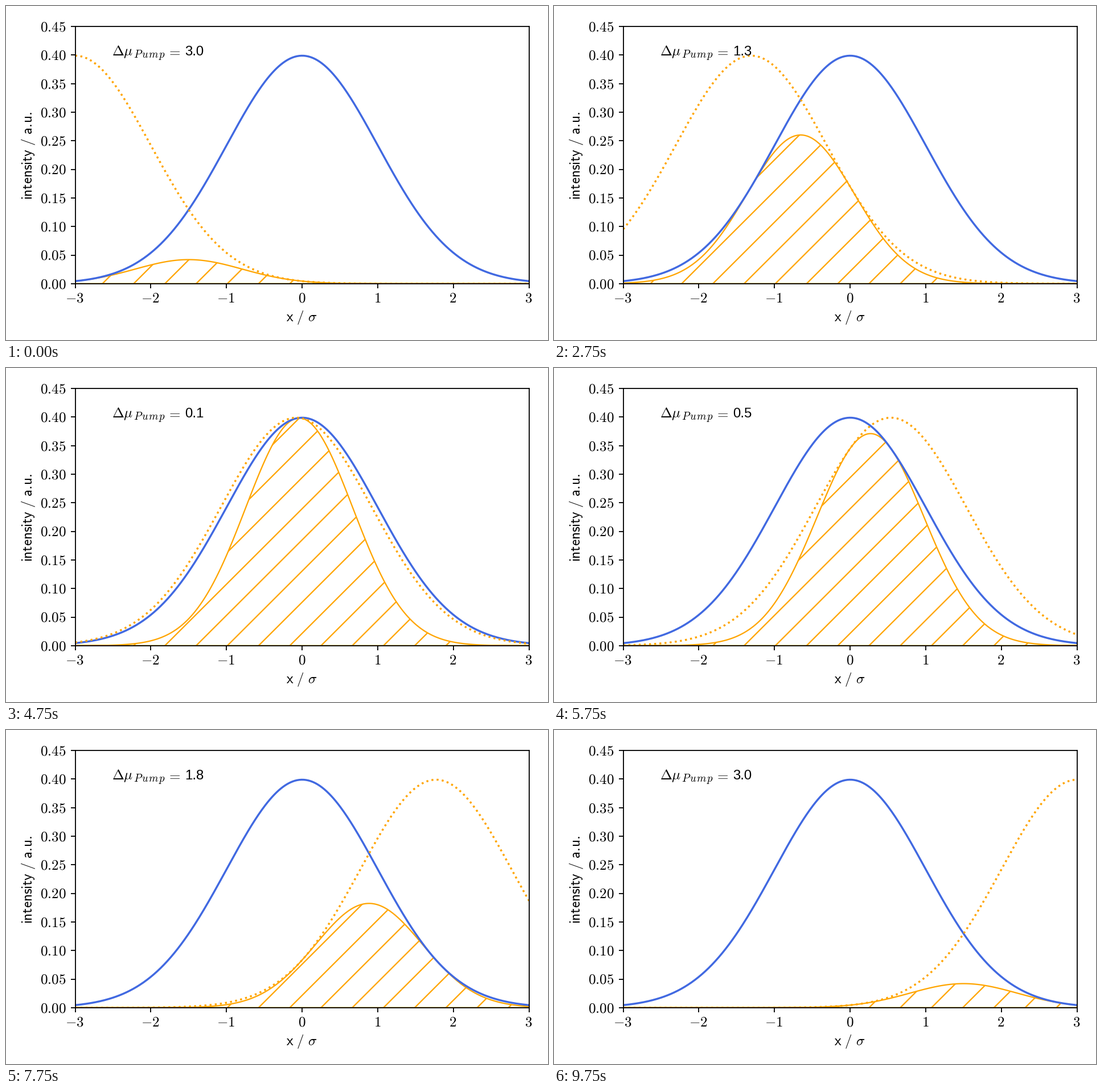
These frames come from a looping animation (952 by 588 pixels, 10 s). A matplotlib script:

```python
import numpy as np
import matplotlib.pyplot as plt
from matplotlib.animation import FuncAnimation
from matplotlib.collections import LineCollection
from matplotlib.transforms import Affine2D

W, H = 952, 588
LEFT, RIGHT, TOP, BOTTOM = 121.6, 918.7, 36.1, 488.8
FRAMES, INTERVAL = 40, 250
PT = 2.285  # pixels per print point
FONT = 11 * PT
ORANGE, BLUE = "orange", "royalblue"

plt.rcParams["mathtext.fontset"] = "cm"

# At 72 dpi one figure point equals one pixel.
fig = plt.figure(figsize=(W / 72, H / 72), dpi=72, facecolor="white")
ax = fig.add_axes([LEFT / W, 1 - BOTTOM / H,
                   (RIGHT - LEFT) / W, (BOTTOM - TOP) / H])
ax.set(xlim=(-3, 3), ylim=(0, 0.45))
pixels = Affine2D().scale(1 / W, -1 / H).translate(0, 1) + fig.transFigure


def label(x, y, text, size=FONT, **kw):
    return ax.text(x, y, text, size=size, va="baseline",
                   transform=pixels, **kw)


def gauss(x, mu=0.0):
    return np.exp(-(x - mu) ** 2 / 2) / np.sqrt(2 * np.pi)


def overlap(mu):
    """Product of both pulses, scaled to the height of a single one."""
    return gauss(x) * gauss(x, mu) * np.sqrt(2 * np.pi)


# Axes, ticks and labels
x_ticks = np.arange(-3, 4)
y_ticks = np.arange(10) * 0.05
ax.set_xticks(x_ticks)
ax.set_yticks(y_ticks)
ax.tick_params(length=3.5 * PT, width=0.8 * PT,
               labelbottom=False, labelleft=False)
for spine in ax.spines.values():
    spine.set_linewidth(0.8 * PT)

for t in x_ticks:
    label(LEFT + (t + 3) / 6 * (RIGHT - LEFT) - 0.8, 522, f"${t}$",
          ha="center")
for t in y_ticks:
    y = BOTTOM - t / 0.45 * (BOTTOM - TOP)
    label(105.3, y + 8.3, f"${t:.2f}$", ha="right")

label(519.2, 555, r"$\mathsf{x}\ \mathsf{/}\ \sigma$", ha="center")
label(46.5, 341, r"$\mathsf{intensity}\ \mathsf{/}\ \mathsf{a.\!u.}$",
      rotation=90, rotation_mode="anchor", ha="left")

label(186.4, 87, r"$\Delta\mu$")
label(224, 91, r"$P\hspace{0.16}u\hspace{0.04}m\hspace{0.06}p$", size=19)
label(282.4, 87, "$=$")
value = label(314.6, 87, "3.0", size=24, family="Liberation Sans")

# Curves
x = np.linspace(-3, 3, 400)
ax.plot(x, gauss(x), color=BLUE, lw=1.5 * PT, zorder=2)
pump, = ax.plot(x, gauss(x, -3), ":", color=ORANGE, lw=1.5 * PT, zorder=2.1)
area, = ax.fill(x, overlap(-3), fill=False, ec=ORANGE, lw=PT, zorder=1.1)

# Diagonal hatching, clipped to the overlap area
starts = 169.4 + 54.85 * np.arange(-8, 14)
rise = BOTTOM - TOP
hatch = LineCollection(
    [[(s, BOTTOM), (s + rise, TOP)] for s in starts],
    colors=ORANGE, linewidths=PT, transform=pixels, zorder=1)
ax.add_collection(hatch, autolim=False)


def update(i):
    mu = -3 + 6 * i / (FRAMES - 1)
    pump.set_ydata(gauss(x, mu))
    outline = np.column_stack([x, overlap(mu)])
    area.set_xy(np.vstack([(-3, 0), outline, (3, 0)]))
    hatch.set_clip_path(area)
    value.set_text(f"{abs(mu):.1f}")
    return pump, area, hatch, value


anim = FuncAnimation(fig, update, frames=FRAMES, interval=INTERVAL,
                     init_func=lambda: update(0), repeat=True, repeat_delay=0)
plt.show()
```
